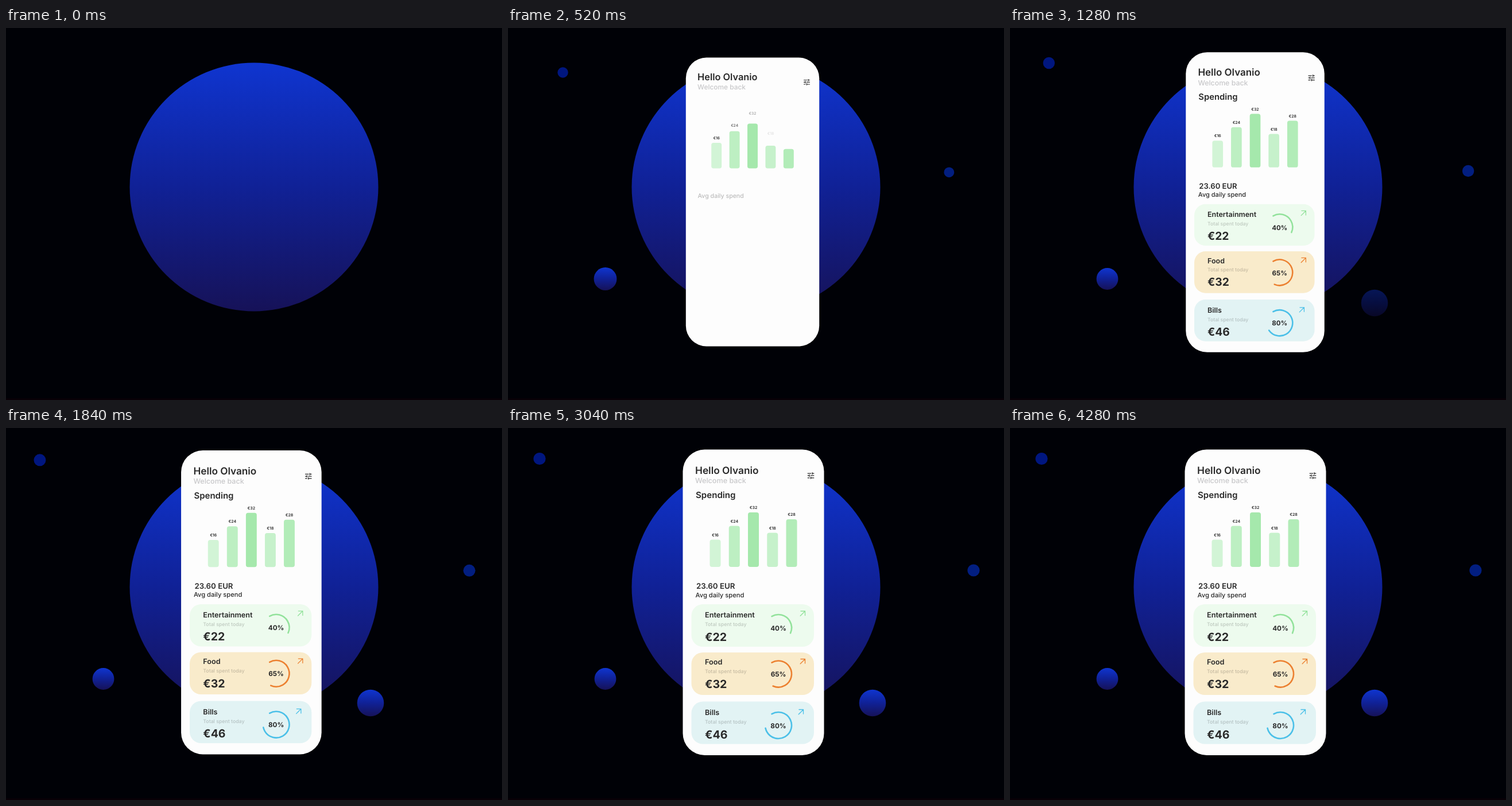
These frames come from a looping animation (864 px wide and 648 px high, 4.36 s). An HTML page:

```html
<!DOCTYPE html>
<html lang="en">
<head>
<meta charset="utf-8">
<title>Spending overview</title>
<style>
  html, body { margin: 0; width: 100%; height: 100%; overflow: hidden; background: #000106; }
  svg { display: block; width: 864px; height: 648px; }
  text { font-family: Inter, sans-serif; font-weight: 600; fill: #292929; text-rendering: geometricPrecision; }
  .mid { text-anchor: middle; }
  .medium { font-weight: 500; }
  .bold { font-weight: 700; }
  .line { fill: none; stroke-linecap: round; stroke-linejoin: round; }
</style>
</head>
<body>
<svg id="stage" viewBox="0 0 864 648"></svg>
<script>
const LOOP = 4360, STEP = 40, BAR_FLOOR = 242;

const bars = [
  { label: '€16', height: 47.5, color: '#d2f4d6' },
  { label: '€24', height: 71.5, color: '#bdefc2' },
  { label: '€32', height: 95, color: '#a5e8ac' },
  { label: '€18', height: 59.5, color: '#c6f1cb' },
  { label: '€28', height: 83, color: '#b2ecb8' },
];
const cards = [
  { name: 'Entertainment', sum: '€22', share: 40, y: 307, textY: 0, ringY: 41, arrow: [513.5, 16], fill: '#edfbee', ink: '#92e29b' },
  { name: 'Food', sum: '€32', share: 65, y: 391, textY: -2, ringY: 37.5, arrow: [513.5, 15.5], fill: '#f9ebcb', ink: '#ec8030' },
  { name: 'Bills', sum: '€46', share: 80, y: 476.5, textY: 0.5, ringY: 41.5, arrow: [510.5, 18], fill: '#e2f3f4', ink: '#4bc0e8' },
];
const dots = [
  { id: 'dotLeft', x: 55, y: 53.5, delay: 0, growDelay: 50 },
  { id: 'dotRight', x: 811, y: 248, delay: 65, growDelay: 150 },
];

const label = (x, y, size, str, extra = '') =>
  `<text x="${x}" y="${y}" font-size="${size}" ${extra}>${str}</text>`;
const barX = i => 361 + i * 33.25;

const barMarkup = (b, i) => `
  <rect id="bar${i}" x="${barX(i) - 9.5}" width="19" rx="4" fill="${b.color}"/>
  ${label(barX(i), BAR_FLOOR - b.height - 6, 7, b.label, `id="tag${i}" class="mid"`)}`;

const cardMarkup = (c, i) => `
  <g id="card${i}">
    <rect x="319.5" y="${c.y}" width="213.5" height="74" rx="20" fill="${c.fill}"/>
    ${label(343, c.y + 23 + c.textY, 12.7, c.name)}
    ${label(343, c.y + 38 + c.textY, 8.8, 'Total spent today', 'class="medium" style="fill:#0003"')}
    ${label(343, c.y + 63.5 + c.textY, 19.6, c.sum, 'class="bold"')}
    ${label(471, c.y + c.ringY + 4.7, 11.7, c.share + '%', 'class="mid bold"')}
    <circle id="ring${i}" class="line" r="23" stroke="${c.ink}" stroke-width="2.6" pathLength="100"
      transform="translate(471 ${c.y + c.ringY}) rotate(-120)"/>
    <path class="line" d="M-4.3 4.3L4 -4M-3.6 -4H4V3.6" stroke="${c.ink}" stroke-width="1.3"
      transform="translate(${c.arrow[0]} ${c.y + c.arrow[1]})"/>
  </g>`;

stage.innerHTML = `
  <defs><linearGradient id="blue" x2="0" y2="1">
    <stop stop-color="#0f35d0"/><stop offset=".5" stop-color="#102196"/><stop offset="1" stop-color="#161258"/>
  </linearGradient></defs>
  <rect width="864" height="648" fill="#000106"/>
  <rect y="645" width="864" height="3" fill="#080006"/>
  <circle id="dotLeft" fill="#00167f"/>
  <circle id="dotRight" fill="#021e80"/>
  <circle cx="432" cy="277" r="216.5" fill="url(#blue)"/>
  <circle id="orbLeft" cx="169.5" cy="437" fill="url(#blue)"/>
  <circle id="orbRight" cx="635" cy="479" r="23.3" fill="url(#blue)"/>
  <g id="phone">
    <rect x="304.5" y="37.6" width="246" height="532.4" rx="38" fill="#fdfdfd"/>
    ${label(326, 79.5, 17.3, 'Hello Olvanio')}
    ${label(326, 96, 12.6, 'Welcome back', 'class="medium" style="fill:#c8c8ca"')}
    <path transform="translate(519.8 75.3) scale(.64)" fill="none" stroke="#292929" stroke-width="2"
      d="M3 6h10M16 3v6M16 6h5M3 12h5M8 9v6M11 12h10M3 18h6M12 15v6M12 18h9"/>
    ${label(327, 122, 15.1, 'Spending', 'id="heading"')}
    ${bars.map(barMarkup).join('')}
    ${label(328, 279.5, 13.3, '23.60 EUR', 'id="average"')}
    ${label(326.5, 294.5, 11.2, 'Avg daily spend', 'id="caption" class="medium"')}
    ${cards.map(cardMarkup).join('')}
  </g>`;

const byId = id => document.getElementById(id);
const set = (id, attrs) => {
  for (const key in attrs) byId(id).setAttribute(key, attrs[key]);
};
const ramp = (t, start, length) => Math.min(1, Math.max(0, (t - start) / length));
const easeOut = p => 1 - (1 - p) ** 3;
const decay = (t, delay, rate) => Math.exp(-rate * Math.max(0, t - delay) / 1000);

const rise = (id, p, distance) =>
  set(id, { opacity: p, transform: `translate(0 ${distance * (1 - p) ** 2})` });

function draw(t) {
  // Everything settles through a quick burst followed by a long cubic drift.
  const drift = (1 - ramp(t, 0, 3000)) ** 3;

  for (const d of dots) {
    const away = 0.18 * drift + 0.82 * decay(t, d.delay, 9.5);
    const small = 0.18 * drift + 0.82 * decay(t, d.growDelay, 7);
    set(d.id, {
      cx: d.x + (432 - d.x) * away,
      cy: d.y + (277 - d.y) * away,
      r: 10.6 * (1 - small),
    });
  }
  set('orbLeft', { r: 18.9 + 3.2 * (1 - ramp(t, 0, 1200)) ** 2, opacity: ramp(t, 20, 260) });
  set('orbRight', { opacity: ramp(t, 1100, 450) });

  const slow = 0.098 * drift, fast = 0.29 * (1 - ramp(t, 0, 480)) ** 2;
  const x = 427.5 - 27 * slow - 122 * fast, y = 303.8 - 15 * slow - 64 * fast;
  set('phone', {
    opacity: ramp(t, 20, 330),
    transform: `translate(${x} ${y}) scale(${1 - slow - fast}) translate(-427.5 -303.8)`,
  });

  bars.forEach((b, i) => {
    const height = b.height * easeOut(ramp(t, 165 + 70 * i, 435));
    set('bar' + i, { y: BAR_FLOOR - height, height });
    rise('tag' + i, ramp(t, 280 + 70 * i, 250), 4);
  });

  rise('caption', ramp(t, 440, 260), 5);
  rise('average', ramp(t, 520, 260), 5);
  rise('heading', ramp(t, 520, 260), 5);

  cards.forEach((c, i) => {
    rise('card' + i, ramp(t, 560 + 100 * i, 260), 12);
    const sweep = c.share * easeOut(ramp(t, 600 + 175 * i, 580));
    set('ring' + i, { 'stroke-dasharray': `${sweep} 200`, opacity: sweep > 0 ? 1 : 0 });
  });
}

const start = performance.now();
function tick() {
  const t = (performance.now() - start) % LOOP;
  draw(Math.floor(t / STEP) * STEP);
  requestAnimationFrame(tick);
}
tick();
</script>
</body>
</html>
```
